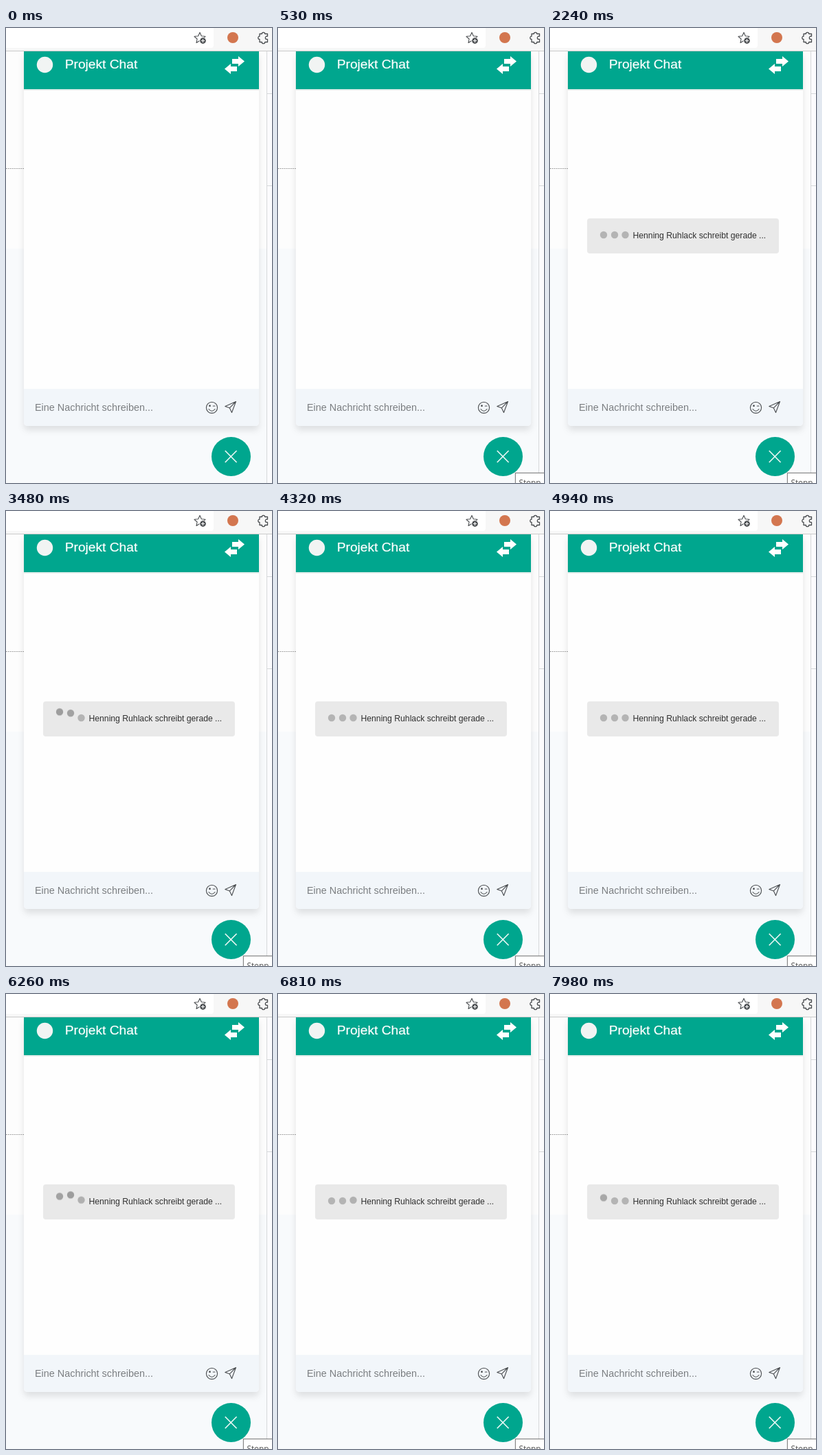
Animation of 387x662 px, one loop 8000 ms. Source, as an HTML page:

```html
<!DOCTYPE html>
<html lang="de">
<head>
<meta charset="utf-8">
<title>Projekt Chat</title>
<style>
  html, body { margin: 0; width: 100%; height: 100%; overflow: hidden; background: #fdfdfd; }
  svg { display: block; width: 387px; height: 662px; }
  text { font-family: "Liberation Sans", Arial, sans-serif; }
  .panel { filter: drop-shadow(0 6px 5px rgba(0, 0, 0, .1)); }
  .line { fill: none; stroke: #4a4d50; stroke-width: 1.1; stroke-linejoin: round; stroke-linecap: round; }
  .dot { fill: #b4b4b4; }
  #tip text { font: 11.7px "Open Sans", "Noto Sans", sans-serif; fill: #505050; }
</style>
</head>
<body>
<svg viewBox="0 0 387 662">
  <!-- page -->
  <rect width="387" height="662" fill="#fdfdfd"/>
  <rect y="321" width="379" height="341" fill="#f8fafc"/>
  <path d="M0 204.5H26" stroke="#a2a2a2" stroke-dasharray="2 1"/>
  <rect x="380" y="34" width="7" height="628" fill="#fbfbfd"/>
  <path d="M379.5 34V662M380 95.5H387M380 229.5H387" stroke="#d6d8da"/>

  <!-- browser bar -->
  <rect width="387" height="33" fill="#f7f7f7"/>
  <path d="M0 0H302V25Q302 29 298 29H0Z" fill="#fff"/>
  <path d="M0 33.5H387" stroke="#cbcbcb"/>
  <path class="line" d="M282 6.5L284.4 11.7L290 12.3L285.8 16L281 19L277 21.5L278.1 16L274 12.3L279.6 11.7Z"/>
  <circle cx="286.5" cy="18.5" r="5.2" fill="#fff"/>
  <circle cx="286.5" cy="18.5" r="4.4" fill="#55585b"/>
  <path d="M284 18.5H289M286.5 16V21" stroke="#fff"/>
  <circle cx="330" cy="14" r="8" fill="#d3764f"/>
  <path class="line" style="stroke-width:1.3" d="M369 8.5H372.3A2.2 2.2 0 0 1 376.7 8.5H380.5V12H379.5A2.2 2.2 0 0 0 379.5 16.4H380.5V20.5H376.7A2.2 2.2 0 0 1 372.3 20.5H369V16.4A2.2 2.2 0 0 1 369 12Z"/>

  <!-- chat window -->
  <path class="panel" d="M26 34H368V573Q368 579 362 579H32Q26 579 26 573Z" fill="#fefefe"/>
  <path d="M26 525H368V573Q368 579 362 579H32Q26 579 26 573Z" fill="#f2f6fa"/>
  <rect x="26" y="89" width="342" height="2" fill="#e6eeec"/>
  <rect x="26" y="34" width="342" height="55" fill="#00a68e"/>
  <circle cx="56.5" cy="53.5" r="11.7" fill="#f1f4f3"/>
  <text x="85.7" y="59" font-size="19.2" fill="#fff" stroke="#fff" stroke-width=".2">Projekt Chat</text>
  <path d="M329 45H338V41L347 48.5L338 56V52H329ZM318 59.5L327 52V56H336V63H327V67Z" fill="#fff"/>

  <!-- input row -->
  <text x="42" y="557" font-size="14.4" fill="#7b7e81">Eine Nachricht schreiben...</text>
  <g class="line">
    <circle cx="299.5" cy="552.3" r="8.1"/>
    <path d="M295 554.5Q299.5 560 304 554.5M301.3 550H304"/>
    <circle cx="296.5" cy="549.7" r=".8" fill="#4a4d50"/>
    <path d="M334.5 543.5L318.8 550.5L325.3 552.8L328.5 559.5ZL325.3 552.8"/>
  </g>

  <!-- close button -->
  <circle cx="327.5" cy="623.5" r="28.5" fill="#00a68e"/>
  <path d="M318.8 615L335.6 632M335.6 615L318.8 632" stroke="#e9f7f4" stroke-width="1.7"/>

  <g id="typing">
    <rect x="54" y="277" width="279" height="51" rx="4" fill="#e9e9e9"/>
    <circle class="dot" cx="78" cy="301" r="5.2"/>
    <circle class="dot" cx="94" cy="301" r="5.2"/>
    <circle class="dot" cx="109.5" cy="301" r="5.2"/>
    <text x="120.5" y="306" font-size="12.2" fill="#303030">Henning Ruhlack schreibt gerade ...</text>
  </g>

  <g id="tip">
    <rect x="344" y="646" width="50" height="30" fill="#000" opacity=".08"/>
    <rect x="345.5" y="647.5" width="50" height="30" fill="#fff" stroke="#858585"/>
    <text x="350.5" y="665.5">Stopp</text>
  </g>
</svg>
<script>
  const LOOP = 8000;
  const TICK = 77;      // hold time of one pose, ms
  const STAGGER = 160;  // delay from dot to dot, ms

  // [time of first visible pose, how far the wave has run by then]
  const waves = [[3250, 45], [5950, 45], [7980, 75]];

  const rest = { transform: 'translateY(0)', fill: '#b4b4b4', easing: 'ease' };
  const peak = { transform: 'translateY(-9px)', fill: '#9c9c9c', easing: 'ease' };
  const hop = [
    { ...rest, offset: 0 },
    { ...peak, offset: .125 },
    { ...rest, offset: .4 },
    { ...rest, offset: 1 }
  ];

  const typing = document.getElementById('typing');
  const tip = document.getElementById('tip');
  const dots = [...document.querySelectorAll('.dot')].map(dot => {
    const anim = dot.animate(hop, { duration: 2000, fill: 'both' });
    anim.pause();
    return anim;
  });

  function waveTime(t) {
    const wave = waves.filter(([from]) => t >= from).pop();
    if (!wave) return 0;
    const [from, lead] = wave;
    return lead + Math.floor((t - from) / TICK) * TICK;
  }

  function draw(t) {
    tip.style.opacity = t < 480 ? 0 : t < 530 ? .5 : 1;
    const shown = t >= 2240 && !(t >= 4860 && t < 4940);
    typing.style.visibility = shown ? 'visible' : 'hidden';
    const w = waveTime(t);
    dots.forEach((dot, i) => { dot.currentTime = Math.max(0, w - i * STAGGER); });
  }

  const start = performance.now();
  function frame() {
    draw((performance.now() - start) % LOOP);
    requestAnimationFrame(frame);
  }
  frame();
</script>
</body>
</html>
```
